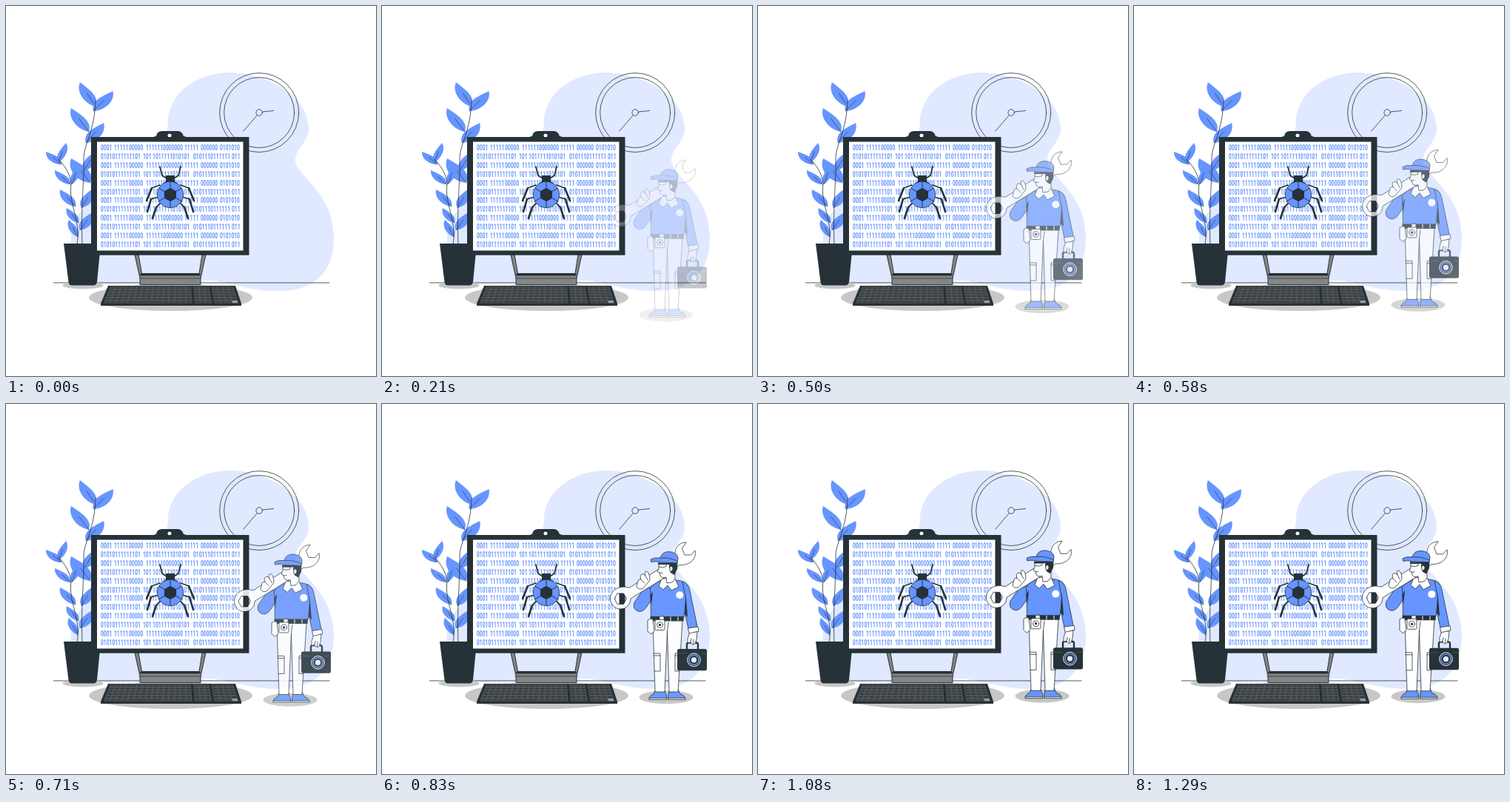
Write an HTML page that moves like this. It is 500x500 px and loops after 1330 ms.

```html
<!DOCTYPE html>
<html lang="en">
<head>
<meta charset="utf-8">
<title>Bug repair</title>
<style>
html, body { margin: 0; width: 100%; height: 100%; overflow: hidden; background: #fff; }
svg { display: block; width: 100vw; height: 100vh; }
.ln { fill: none; stroke: #263238; stroke-width: .8; stroke-linecap: round; stroke-linejoin: round; }
.w, .b { stroke: #263238; stroke-width: .8; stroke-linejoin: round; }
.w { fill: #fff; }
.b { fill: #6695ff; }
.d { fill: #263238; }
.sh { fill: #c7c7c7; }
#code { font: 700 10.4px Roboto, Arial, sans-serif; fill: #6695ff; }
#leaves .b { stroke: none; }
#leaves .ln { stroke-width: .6; }
#bug .ln { stroke-width: 1.8; }
</style>
</head>
<body>
<svg viewBox="0 0 500 500">
  <path fill="#e0e9ff" d="M219 152C222 118 257 90 302 90C351 90 411 122 409 168C407 187 390 192 391 210C394 232 442 250 443 314C443 358 418 385 370 385C323 385 299 371 270 371C220 373 150 378 110 374C86 366 82 312 94 288C122 240 221 222 219 152Z"/>
  <g class="ln">
    <circle cx="342.200" cy="144" r="53.500"/>
    <circle cx="342.200" cy="144" r="47.500"/>
    <circle cx="342.200" cy="144" r="4.300"/>
    <path d="M346.500 143L361.500 141.500M339.500 147.400L320.700 169.200"/>
  </g>
  <path class="ln" d="M64.500 374H437"/>

  <ellipse class="sh" cx="104" cy="377.500" rx="27.500" ry="5"/>
  <g id="leaves"></g>
  <path class="ln" d="M103 322C101 270 106 235 105 205C106 185 120 168 121 128M96 322C102 290 84 268 88 240C87 228 79 214 70 207"/>
  <path class="d" d="M78 321H128L123 373Q122 377.500 118 377.500H89Q85 377.500 84.500 373Z"/>

  <ellipse class="sh" cx="222.500" cy="394" rx="110.500" ry="18"/>
  <path fill="#858786" stroke="#263238" stroke-width="1" d="M174 336H179L183.500 361.500H261L265 336H270L263 368V376.500H181V368Z"/>
  <path class="ln" d="M181 368H263"/>
  <path class="ln" d="M182.500 363H261.500" stroke-linecap="butt" style="stroke-width:2.800"/>
  <path class="d" d="M199 179Q199 176 203 176Q204 169 211 169H232Q238 169 240 176Q244 176 244 179Z"/>
  <circle cx="221" cy="175" r="2.500" fill="#fff"/>
  <rect class="d" x="115" y="177" width="213.500" height="159.700"/>
  <rect x="123" y="183.500" width="197.500" height="147" fill="#fff"/>
  <g id="code"></g>
  <g id="bug"></g>
  <g id="keys"></g>

  <g id="man" opacity="0">
    <ellipse class="sh" cx="384" cy="395.300" rx="36.500" ry="9"/>
    <!-- shoes and legs -->
    <path class="b" d="M370 384H381L384.500 393V398H361Q361 393 367 391Z"/>
    <path class="b" d="M400 384H389L386.500 393V398H410Q410 393 403 391Z"/>
    <path class="w" d="M361 396.500H384.500V398.500H361ZM386.500 396.500H410V398.500H386.500Z"/>
    <path class="w" d="M366 291H406L400 388H388L385.500 306L382 388H369Z"/>
    <path class="ln" d="M385.500 306L387 294M367 336H376V360H368M403.500 336H396V360H402M367 339H376M403 339H396"/>
    <!-- far arm -->
    <path class="b" d="M352 251L341 267Q338 276 346 279Q352 281 357 274L365 262V246Z"/>
    <!-- torso -->
    <path class="b" d="M362.500 248Q368 240 380 237H397Q411 238 414 246L408 287H363.500Z"/>
    <path class="b" d="M406 239Q414 241 416 251L426.500 302L414.500 305L409 280L410.500 262Z"/>
    <path class="d" d="M410.500 256L413 287L409 283ZM362.500 258L366 252L364 272Z"/>
    <path class="w" d="M378 235L374 245L380 250L386 244L391 251L401 246L396 235Z"/>
    <circle cx="402.300" cy="257.300" r="5" fill="#fff"/>
    <!-- wrench -->
    <path class="w" fill-rule="evenodd" d="M334 247.500L397 207.500C393 196 400 186 411 186L405.500 194L409 203L417.500 203L423 197C426 209 414 218 402 216.500L383 233L336 262C336 270 330 276 322 276C314 276 308.500 269 308.500 262C308.500 250 322 243 334 247.500Z
      M314 262L318 255H326.500L330.500 262L326.500 269.500H318Z"/>
    <!-- far hand -->
    <path class="w" d="M344 246L346 238Q347 235 350 236Q348 231 351 229Q354 228 356 231Q354 226 357 225Q360 225 362 233Q363 238 358 242L353 248Q347 251 344 246Z"/>
    <path class="ln" d="M350 236L355 241M356 231L359 237"/>
    <!-- belt -->
    <path class="d" d="M362.500 286H408L407.500 292.500H363Z"/>
    <rect class="w" x="375" y="286" width="6" height="5.500"/>
    <path d="M390 286.500V292M400 286.500V292" stroke="#fff"/>
    <path class="w" d="M359 291Q362 288 366 290L368 306L363 310L359 306Z"/>
    <rect class="w" x="369" y="290.500" width="13" height="14" rx="1.500"/>
    <circle class="ln" cx="375.500" cy="297.500" r="4"/>
    <circle class="d" cx="375.500" cy="297.500" r="1.700"/>
    <!-- head -->
    <path class="w" d="M375 212L374 221L372 225.500L375 227L376 231Q378 235 384 233L385 241L392 240L396 235V212Z"/>
    <path class="d" d="M389 212H399.500L399 222L395 230L390 227L388 219Z"/>
    <path class="w" d="M389 219Q393 217 393 222Q392 226 389 225Z"/>
    <path class="w" d="M374 215.500H384V218.500Q380 221 374 219Z"/>
    <path class="d" d="M373 213.500H392V216H373Z"/>
    <path class="ln" d="M375 227.500L379 227"/>
    <path class="b" d="M363 209Q368 206 376 207Q378 199 387 198.500Q399 199 400 207L399 214L377 213Q370 211 363.500 212.500Z"/>
    <path class="ln" d="M376 207Q388 206 399 211"/>
    <!-- bag and near hand -->
    <path fill="none" stroke="#263238" stroke-width="2.400" d="M412 331V324Q412 321.500 415 321.500H424Q427 321.500 427 324V331"/>
    <path class="w" d="M416 307H426L425 317L423 323Q419 326 417 321L413 322L413 316Z"/>
    <path class="ln" d="M418 316L417 321M421 317L420.500 323"/>
    <path class="w" d="M413.500 302L427 300L428 306L415 309Z"/>
    <rect class="d" x="399" y="330" width="40" height="29.300" rx="2.500"/>
    <path d="M399.500 336H412M431 336H438.500" stroke="#59646a" stroke-width=".6"/>
    <circle cx="421.500" cy="344.800" r="8.800" fill="none" stroke="#fff" stroke-width="1"/>
    <circle cx="421.500" cy="344.800" r="6.500" fill="none" stroke="#6695ff" stroke-width="1.400"/>
    <circle cx="421.500" cy="344.800" r="3.600" fill="#e6edff"/>
  </g>
</svg>
<script>
const $ = id => document.getElementById(id);
const path = (cls, d, extra = "") => `<path class="${cls}" d="${d}" ${extra}/>`;

// Leaf from base to tip: the outer edge swells near the tip, the inner near the base
function leaf([bx, by, tx, ty, width]) {
  const dx = tx - bx, dy = ty - by, n = Math.hypot(dx, dy);
  const w = dx < 0 ? width : -width;
  const px = -dy / n * w, py = dx / n * w;
  const at = (k, s) => `${bx + dx * k + px * s} ${by + dy * k + py * s}`;
  return path("b", `M${bx} ${by}C${at(.2, 1.3)} ${at(.55, .7)} ${tx} ${ty}C${at(.8, -1.3)} ${at(.3, -1.2)} ${bx} ${by}Z`) +
    path("ln", `M${bx} ${by}L${at(.55, 0)}`);
}
$("leaves").innerHTML = [
  [121, 136, 100, 103, 9], [118, 142, 144.5, 115, 9], [112, 170, 88, 138, 9],
  [108, 185, 132, 158, 9], [114, 239, 88, 206, 11], [105, 223, 122, 195, 8],
  [75, 214, 54, 197, 6], [71, 211, 81, 185, 6], [87, 241, 66, 222, 6],
  [89, 241, 99, 212, 6], [94, 271, 73, 248, 7], [98, 293, 82, 273, 6],
  [97, 312, 85, 289, 6], [102, 273, 118, 246, 8], [100, 303, 118, 278, 8]
].map(leaf).join("");

// Binary listing in condensed figures
const squeeze = .645;
const lines = [
  [[128, "0001"], [146, "11111"], [166, "00000"], [189, "1111110000000"],
   [241, "11111"], [263, "000000"], [289, "0101010"]],
  [[128, "01010111111101"], [185, "101"], [198, "1"], [202, "011111010101"],
   [253, "0101110111111"], [305, "011"]]
];
let rows = "";
for (let i = 0; i < 12; i++)
  for (const [x, word] of lines[i % 2])
    rows += `<text transform="translate(${x} ${195.2 + i * 11.88}) scale(${squeeze} 1)">${word}</text>`;
$("code").innerHTML = rows;

// Bug: one half mirrored around its axis
const half = path("ln", "M14 -38L11 -26L5 -22M14 -13L25 -9M16 3L26 6M14 12L19 17") +
  path("ln", "M25 -9L32 8M26 6L31 23M19 17L24 32", 'style="stroke-width:2.600"');
const hex = r => [...Array(6)].map((_, i) =>
  [r * Math.sin(i * Math.PI / 3), r * Math.cos(i * Math.PI / 3)]);
const inner = hex(9.3), outer = hex(17.5);
$("bug").innerHTML = `<g transform="translate(222 255)">
  ${half}<g transform="scale(-1 1)">${half}</g>
  <path class="d" d="M-6 -26H6V-18L10 -15H-10L-6 -18Z"/>
  <circle class="b" r="17.700"/>
  <path d="${inner.map((p, i) => `M${p}L${outer[i]}`).join("")}" stroke="#263238"/>
  <polygon class="d" points="${inner.join(" ")}"/></g>`;

// Keyboard in perspective
const edge = y => [138 - (y - 378) * .41, 310 + (y - 378) * .33];
function key(a, b, top, bottom, fill) {
  const pt = (k, y) => { const [l, r] = edge(y); return [l + (r - l) * k, y]; };
  return `<polygon points="${[pt(a, top), pt(b, top), pt(b, bottom), pt(a, bottom)].join(" ")}" fill="${fill}" stroke="#7d8182" stroke-width=".45"/>`;
}
let keys = path("d", "M138 378H310L318 402V405H128V402Z");
const blocks = [[.02, .65, 15], [.67, .79, 3], [.81, .98, 4]];
for (let r = 0; r < 6; r++) {
  const top = 379.5 + r * 3.75;
  for (const [from, to, n] of blocks) {
    const w = (to - from) / n;
    for (let i = 0; i < n; i++) {
      const space = r === 5 && n === 15;
      if (space && i > 4 && i < 10) continue;
      const last = r === 5 && n === 4 && i === 3;
      const end = space && i === 4 ? 10 : i + 1;
      keys += key(from + i * w + .002, from + end * w - .002, top, top + 2.9, last ? "#a5a8a8" : "#34393b");
    }
  }
}
$("keys").innerHTML = keys;

// Rise with a slight overshoot: [time, height below rest]
const loop = 1330, start = 170, rise = 30;
const track = [[170, 24], [330, 16.5], [500, 11], [710, 4.5], [830, 1],
  [940, -.4], [1080, -.7], [1210, -.5], [1330, 0]];

function offset(t) {
  let i = 0;
  while (i < track.length - 2 && t > track[i + 1][0]) i++;
  const [t0, y0] = track[i], [t1, y1] = track[i + 1];
  return y0 + (y1 - y0) * (t - t0) / (t1 - t0);
}

const man = $("man");
function draw(ms) {
  const t = ms % loop;
  const y = offset(Math.max(t, start));
  man.setAttribute("transform", `translate(0 ${y.toFixed(2)})`);
  man.setAttribute("opacity", t < start ? 0 : Math.min(1, 1 - y / rise));
}

let origin;
function tick(now) {
  origin ??= now;
  draw(now - origin);
  requestAnimationFrame(tick);
}
requestAnimationFrame(tick);
</script>
</body>
</html>
```
